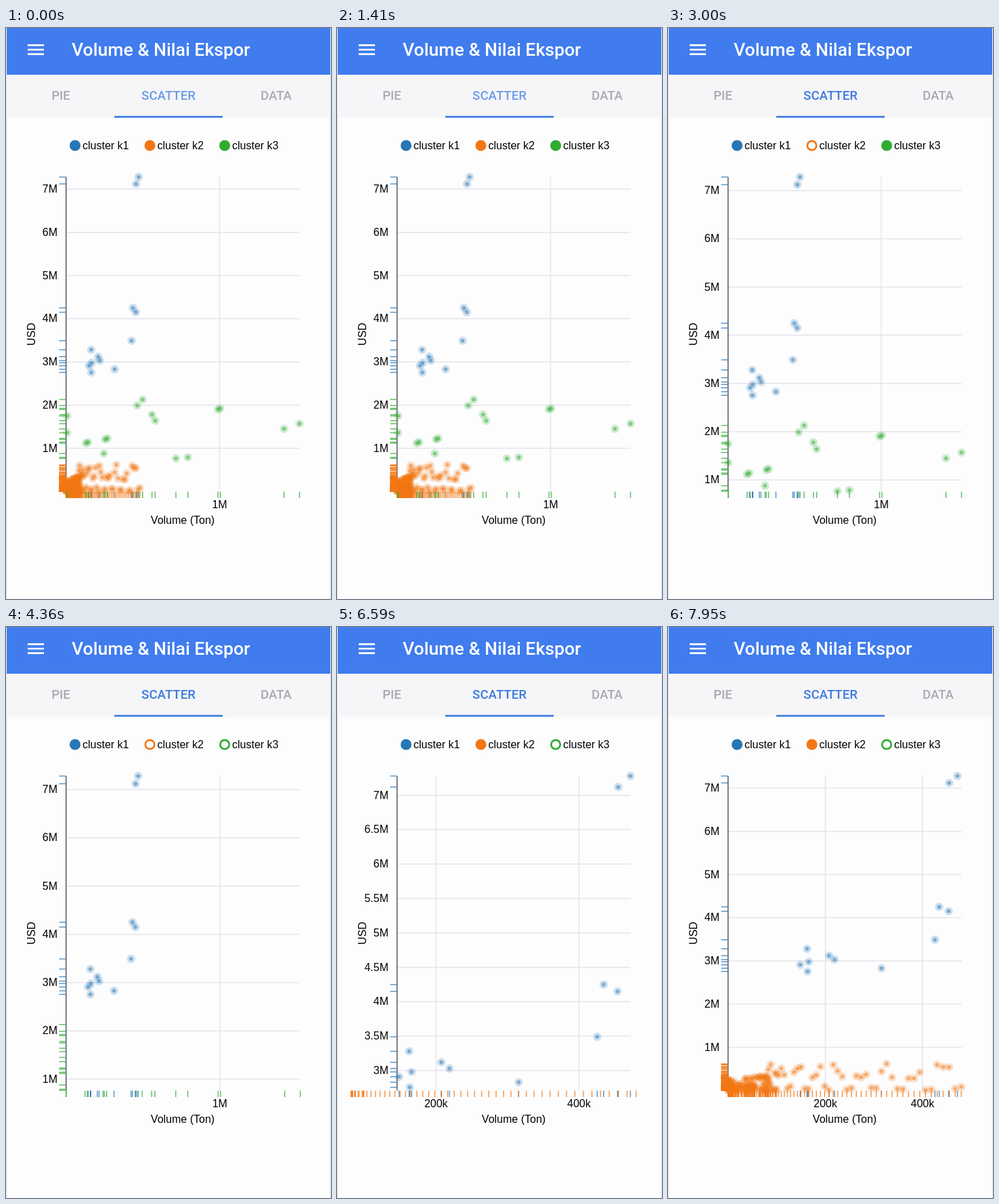
Animation, 480 px wide and 843 px high, one loop 8 s. Source, as an HTML page with a canvas:

```html
<!DOCTYPE html>
<html lang="id">
<head>
<meta charset="utf-8">
<title>Scatter</title>
<style>
  html, body { margin: 0; width: 100%; height: 100%; overflow: hidden; background: #fdfdfe; }
  svg, canvas { position: absolute; left: 0; top: 0; width: 480px; height: 843px; }
  .roboto { font-family: Roboto, sans-serif; font-weight: 500; }
  .tab { font-size: 18.67px; text-anchor: middle; fill: #aaa9ad; }
  .label { font: 16px "Liberation Sans", Arial, sans-serif; fill: #000; }
</style>
</head>
<body>
<svg viewBox="0 0 480 843">
  <path d="M.5 69V843M479.5 69V843" stroke="#e4e3ea" stroke-width="1.6"/>
  <rect x="1" width="478" height="69" fill="#407cee"/>
  <path d="M32 25.3H56M32 32H56M32 38.7H56" stroke="#fff" stroke-width="2.67"/>
  <text class="roboto" x="97" y="41" font-size="26.6" fill="#fff">Volume &amp; Nilai Ekspor</text>
  <rect x="1" y="69" width="478" height="63.5" fill="#f6f5f8"/>
  <text class="roboto tab" x="81" y="106">PIE</text>
  <text class="roboto tab" x="240" y="106" id="active">SCATTER</text>
  <text class="roboto tab" x="399" y="106">DATA</text>
  <rect x="160" y="129.8" width="160" height="2.67" fill="#3b7ade"/>
  <g id="legend"></g>
  <text class="label" x="261" y="732" text-anchor="middle">Volume (Ton)</text>
  <text class="label" transform="translate(43 452) rotate(-90)" text-anchor="middle">USD</text>
</svg>
<canvas></canvas>
<script>
const LOOP = 8000, DURATION = 250;
const LEFT = 89, RIGHT = 433.5, TOP = 220, BOTTOM = 684.3;
const COLORS = ['#2777b4', '#f27714', '#31ab31'];

let seed = 7;
const random = () => (seed = (seed * 16807) % 2147483647) / 2147483647;
const scatter = (count, place) => Array.from({ length: count }, place);

// Values in millions, as [volume, usd].
const k1 = [
  [.472, 7.28], [.455, 7.12], [.4345, 4.25], [.454, 4.15], [.4256, 3.49], [.1624, 3.28],
  [.2075, 3.12], [.2188, 3.03], [.1657, 2.98], [.1483, 2.91], [.3156, 2.83], [.1633, 2.756]
];
// Close neighbours in k3 come as a key point and a twin slightly up and right.
const twin = (x, y) => [[x, y], [x + .015, y + .025]];
const k3 = [
  ...twin(.128, 1.118), ...twin(.253, 1.206), ...twin(.989, 1.9),
  [.006, 1.75], [.006, 1.36], [.245, .88], [.463, 1.99], [.498, 2.13], [.559, 1.78],
  [.58, 1.64], [.715, .766], [.793, .79], [1.42, 1.45], [1.521, 1.57]
];
// k2 crowds the origin and thins out into an upper and a lower band.
const crowd = scatter(105, () => {
  const x = .1 * random() ** 2.3;
  return [x, (.26 + 1.6 * x) * random() ** 1.7];
});
const bands = scatter(50, (_, i) => {
  const x = .065 + .415 * (i / 49) ** 1.5;
  return [x, i % 5 < 3 ? .28 + .34 * random() : .1 * random()];
});
const clusters = [k1, crowd.concat(bands), k3];

const range = (from, to, step) =>
  Array.from({ length: Math.round((to - from) / step) + 1 }, (_, i) => from + i * step);
const whole = range(1, 7, 1), halves = range(3, 7, .5);
const views = [
  { at: 0, on: [1, 1, 1], x: [0, 1.521], y: [0, 7.28], xTicks: [1], yTicks: whole },
  { at: 2700, on: [1, 0, 1], x: [.006, 1.521], y: [.761, 7.28], xTicks: [1], yTicks: whole },
  { at: 4345, on: [1, 0, 0], x: [.1483, .472], y: [2.753, 7.28], xTicks: [.2, .4], yTicks: halves },
  { at: 6545, on: [1, 1, 0], x: [0, .4804], y: [0, 7.28], xTicks: [.2, .4], yTicks: whole }
];

const legend = document.getElementById('legend');
legend.innerHTML = COLORS.map((color, i) => {
  const x = 102 + 110.5 * i;
  return `<circle cx="${x}" cy="173.5" r="6.7" stroke="${color}" stroke-width="2.7"/>
    <text class="label" x="${x + 11}" y="178.8">cluster k${i + 1}</text>`;
}).join('');
const bullets = legend.querySelectorAll('circle');
const activeTab = document.getElementById('active');

const canvas = document.querySelector('canvas');
const ratio = window.devicePixelRatio || 1;
canvas.width = 480 * ratio;
canvas.height = 843 * ratio;
const ctx = canvas.getContext('2d');
ctx.scale(ratio, ratio);

const mix = (a, b, p) => a + (b - a) * p;
const cubicInOut = t => t < .5 ? 4 * t ** 3 : 1 - 4 * (1 - t) ** 3;
const scaleX = (view, v) => mix(LEFT, RIGHT, (v - view.x[0]) / (view.x[1] - view.x[0]));
const scaleY = (view, v) => mix(BOTTOM, TOP, (v - view.y[0]) / (view.y[1] - view.y[0]));
const format = v => v < 1 ? Math.round(v * 1000) + 'k' : v + 'M';

function line(x1, y1, x2, y2) {
  ctx.beginPath();
  ctx.moveTo(x1, y1);
  ctx.lineTo(x2, y2);
  ctx.stroke();
}

function dot(x, y, r, alpha) {
  ctx.globalAlpha = alpha;
  ctx.beginPath();
  ctx.arc(x, y, r, 0, 7);
  ctx.fill();
}

// Ticks shared by both views stay; the others fade in or out.
function eachTick(before, after, p, draw) {
  for (const v of new Set([...before, ...after])) {
    ctx.globalAlpha = !after.includes(v) ? 1 - p : !before.includes(v) ? p : 1;
    if (ctx.globalAlpha > .01) draw(v);
  }
}

function drawAxes(from, to, p, px, py) {
  ctx.font = '16px "Liberation Sans", Arial, sans-serif';
  ctx.fillStyle = '#000';
  ctx.strokeStyle = '#e5e4eb';
  ctx.lineWidth = 1.5;
  ctx.textAlign = 'right';
  eachTick(from.yTicks, to.yTicks, p, v => {
    line(LEFT, py(v), RIGHT, py(v));
    ctx.fillText(format(v), 76, py(v) + 5.2);
  });
  ctx.textAlign = 'center';
  eachTick(from.xTicks, to.xTicks, p, v => {
    line(px(v), TOP, px(v), BOTTOM);
    ctx.fillText(format(v), px(v), 708.5);
  });
  ctx.globalAlpha = 1;
  ctx.strokeStyle = '#5d6068';
  ctx.lineWidth = 1.6;
  line(88.7, TOP, 88.7, BOTTOM);
}

function drawCluster(i, showDots, px, py) {
  ctx.fillStyle = ctx.strokeStyle = COLORS[i];
  if (showDots) {
    for (const [x, y] of clusters[i]) {
      dot(px(x), py(y), 6.2, .22);
      dot(px(x), py(y), 2.8, .5);
    }
  }
  ctx.globalAlpha = .8;
  ctx.lineWidth = 1.4;
  for (const [x, y] of clusters[i]) {
    line(px(x), 684.5, px(x), 694);
    line(78.5, py(y), 88.5, py(y));
  }
}

function render(time) {
  const index = views.findLastIndex(view => time >= view.at);
  const to = views[index], from = views[Math.max(0, index - 1)];
  const t = index ? Math.min(1, (time - to.at) / DURATION) : 1;
  const p = cubicInOut(t);
  const px = v => mix(scaleX(from, v), scaleX(to, v), p);
  const py = v => mix(scaleY(from, v), scaleY(to, v), p);

  bullets.forEach((bullet, i) => bullet.setAttribute('fill', to.on[i] ? COLORS[i] : '#fff'));
  activeTab.style.fill = index ? '#3b7ade' : '#6b9ce8';

  ctx.clearRect(0, 0, 480, 843);
  ctx.save();
  ctx.beginPath();
  ctx.rect(20, 200, 436, 540);
  ctx.clip();
  drawAxes(from, to, p, px, py);
  // A hidden cluster loses its dots at once, its rug marks when the zoom ends.
  clusters.forEach((_, i) => {
    if (to.on[i] || (from.on[i] && t < 1)) drawCluster(i, to.on[i], px, py);
  });
  ctx.restore();
}

const start = performance.now();
function tick() {
  render((performance.now() - start) % LOOP);
  requestAnimationFrame(tick);
}
tick();
</script>
</body>
</html>
```
